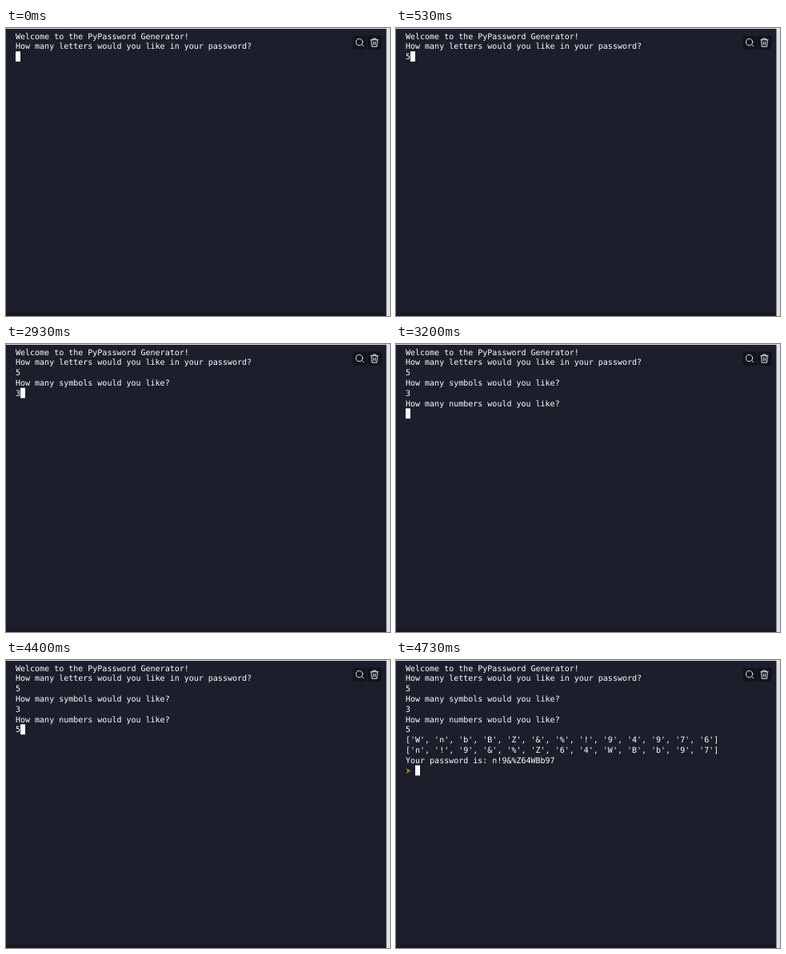
An HTML page that plays this animation: 480 by 360 pixels, repeating every 5.07 s.

```html
<!DOCTYPE html>
<html lang="en">
<head>
<meta charset="utf-8">
<title>Password generator console</title>
<style>
  html, body { margin: 0; width: 100%; height: 100%; overflow: hidden; background: #1c1f2b; }
  svg { display: block; width: 480px; height: 360px; }
  text {
    font: 10px "DejaVu Sans Mono", "Noto Sans Mono", monospace;
    fill: #fff;
    text-rendering: geometricPrecision;
    white-space: pre;
  }
  .icon { fill: none; stroke: #e4e6ec; stroke-width: 1; stroke-linecap: round; stroke-linejoin: round; }
</style>
</head>
<body>
<svg viewBox="0 0 480 360">
  <rect width="480" height="360" fill="#1c1f2b"/>
  <rect y="356" width="476" height="4" fill="#171923"/>
  <rect width="480" height="1" fill="#d9dce2"/>
  <rect x="475.5" width="4.5" height="360" fill="#dfe2e8"/>

  <g fill="#11131d">
    <rect x="433.5" y="9.5" width="17.5" height="17.5" rx="3"/>
    <rect x="452" y="9.5" width="17.5" height="17.5" rx="3"/>
  </g>
  <g class="icon">
    <circle cx="441.7" cy="17.6" r="4.1"/>
    <path d="M444.7 20.6L447 22.9"/>
    <path d="M455.8 14.8H465.2M458.6 14.6V13.2H462.4V14.6M456.8 15L457.3 23.2H463.7L464.2 15M459.4 17.4V20.8M461.6 17.4V20.8"/>
  </g>

  <g id="screen"></g>
  <path id="prompt" d="M12.4 135.2L18.2 138.6L12.4 142L14.4 138.6Z" fill="#a8962b"/>
  <rect id="cursor" width="6" height="12.8" fill="#fff"/>
</svg>
<script>
  const LOOP = 5070, LEFT = 12, TOP = 3.6, ROW = 12.8, CHAR = 6.02;
  const list = chars => "[" + [...chars].map(c => `'${c}'`).join(", ") + "]";

  const lines = [
    "Welcome to the PyPassword Generator!",
    "How many letters would you like in your password?",
    "5",
    "How many symbols would you like?",
    "3",
    "How many numbers would you like?",
    "5",
    list("WnbBZ&%!94976"),
    list("n!9&%Z64WBb97"),
    "Your password is: n!9&%Z64WBb97"
  ];

  // [start ms, lines shown, cursor row, cursor column]
  const steps = [
    [0, 2, 2, 0],
    [530, 3, 2, 1],
    [1470, 4, 4, 0],
    [2930, 5, 4, 1],
    [3200, 6, 6, 0],
    [4400, 7, 6, 1],
    [4730, 10, 10, 2]
  ];

  const screen = document.getElementById("screen");
  const prompt = document.getElementById("prompt");
  const cursor = document.getElementById("cursor");

  const rows = lines.map((line, i) => {
    const el = document.createElementNS("http://www.w3.org/2000/svg", "text");
    el.setAttribute("x", LEFT);
    el.setAttribute("y", TOP + i * ROW + 10);
    el.textContent = line;
    return screen.appendChild(el);
  });

  const show = (el, on) => el.setAttribute("visibility", on ? "visible" : "hidden");

  function draw(time) {
    const [, count, row, col] = steps.findLast(s => s[0] <= time);
    rows.forEach((el, i) => show(el, i < count));
    show(prompt, count === lines.length);
    cursor.setAttribute("x", LEFT + col * CHAR);
    cursor.setAttribute("y", TOP + row * ROW);
  }

  const start = performance.now();
  function tick() {
    draw((performance.now() - start) % LOOP);
    requestAnimationFrame(tick);
  }
  draw(0);
  requestAnimationFrame(tick);
</script>
</body>
</html>
```
